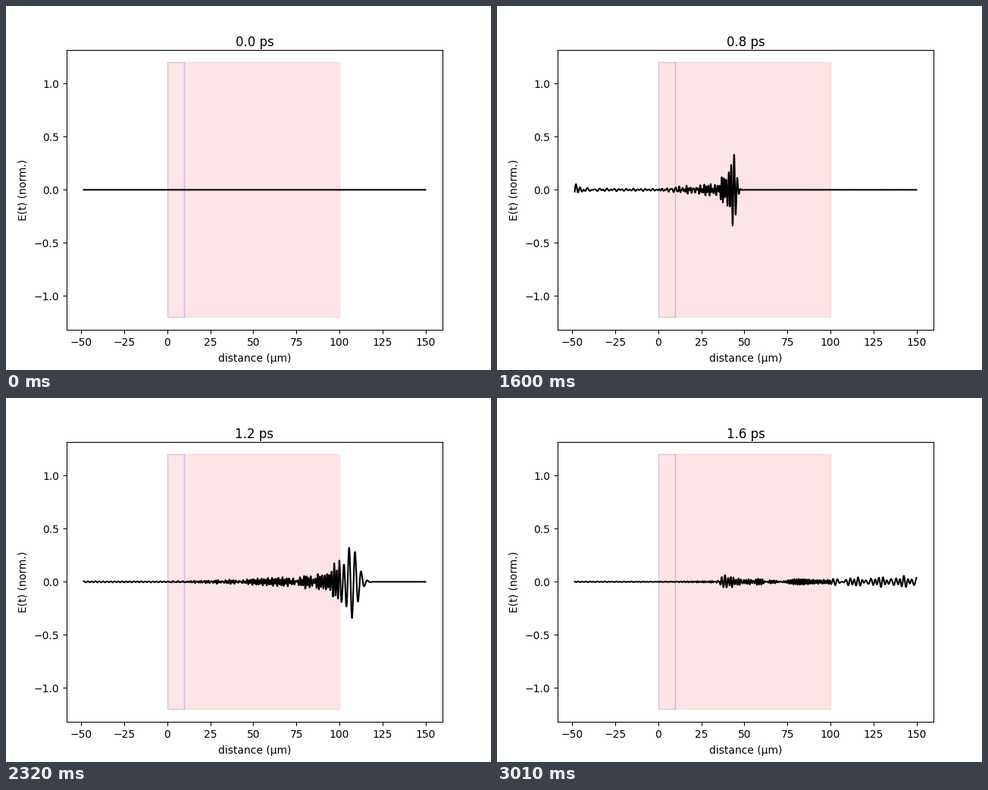
These frames come from a looping animation (640 px wide and 480 px high, 3040 ms). A matplotlib script:

```python
import numpy as np
import matplotlib.pyplot as plt
from matplotlib.animation import FuncAnimation
from matplotlib.patches import Rectangle

LOOP_MS, TICK_MS = 3040, 20
C = 300.0              # speed of light, um/ps
STEP_PS = 0.0161       # simulated time between two pictures
STEPS = 100
ARRIVAL = 0.565        # pulse centre reaches the surface, ps
CARRIER, WIDTH = 100.0, 0.0071   # THz, ps
COAT, SLAB = 10.0, 90.0          # layer thicknesses, um

freq = np.arange(0.125, 230, 0.125)
z = np.linspace(-48.47, 149.9, 1500)


def index(eps, *lines):
    """Complex refractive index from (strength, resonance, damping) lines."""
    total = eps + 0j
    for s, f0, g in lines:
        total = total + s * f0**2 / (f0**2 - freq**2 - 1j * g * freq)
    return np.sqrt(total)


def wave(n, path):
    return np.exp(2j * np.pi / C * (freq * n)[:, None] * path)


def reflect(a, b):
    return (a - b) / (a + b)


def column(a):
    return a[:, None]


def solve_field():
    """Field of the pulse crossing air / coating / slab / air, per step."""
    air = np.ones_like(freq) + 0j
    n1 = index(1.89, (0.92, 30, 6), (0.2, 200, 5), (0.003, 79, 0.2))
    n2 = index(3.41, (0.555, 30, 3), (0.05, 135, 0.12))
    r01, r12, r23 = reflect(air, n1), reflect(n1, n2), reflect(n2, air)

    # reflections seen from the left, gathered from the back to the front
    g2 = r23 * wave(n2, 2 * SLAB)[:, 0]
    back1 = (r12 + g2) / (1 + r12 * g2)
    g1 = back1 * wave(n1, 2 * COAT)[:, 0]
    back0 = (r01 + g1) / (1 + r01 * g1)

    # forward amplitudes at the start of each layer
    a1 = (1 + r01) / (1 + r01 * g1)
    a2 = a1 * wave(n1, COAT)[:, 0] * (1 + r12) / (1 + r12 * g2)
    a3 = a2 * wave(n2, SLAB)[:, 0] * (1 + r23)

    end = COAT + SLAB
    before, after = z[z < 0], z[z >= end] - end
    coat = z[(z >= 0) & (z < COAT)]
    slab = z[(z >= COAT) & (z < end)] - COAT
    modes = np.hstack([
        wave(air, before) + column(back0) * wave(air, -before),
        column(a1) * (wave(n1, coat)
                      + column(back1) * wave(n1, 2 * COAT - coat)),
        column(a2) * (wave(n2, slab)
                      + column(r23) * wave(n2, 2 * SLAB - slab)),
        column(a3) * wave(air, after),
    ])

    spectrum = 1j * WIDTH * np.sqrt(np.pi) * np.exp(
        -(np.pi * WIDTH * (freq - CARRIER))**2)
    tau = np.arange(STEPS) * STEP_PS - ARRIVAL
    phase = np.exp(-2j * np.pi * tau[:, None] * freq)
    field = ((phase * spectrum) @ modes).real * (freq[1] - freq[0])
    field[tau < -0.19] = 0
    return field


def step_at(ms):
    if ms < 700:
        return 4 + (ms - 130) * 6 // 190
    if ms < 760:
        return 22
    return min(24 + (ms - 760) // 30, STEPS - 1)


field = solve_field()

plt.rcParams["font.family"] = "DejaVu Sans"
fig, ax = plt.subplots(figsize=(6.4, 4.8), dpi=100)
ax.add_patch(Rectangle((0, -1.2), 100, 2.4, facecolor="#fde4e6",
                       edgecolor="#fad8da", lw=1))
edge = dict(color="blue", lw=1, zorder=1.5, solid_capstyle="butt")
ax.plot([COAT, 0, 0, COAT], [1.2, 1.2, -1.2, -1.2], alpha=0.1, **edge)
ax.plot([COAT, COAT], [-1.2, 1.2], alpha=0.2, **edge)
line, = ax.plot(z, field[0], color="black", lw=1.5)

ax.set_xlim(-58.39, 159.82)
ax.set_ylim(-1.32, 1.32)
ax.set_xlabel("distance (µm)", labelpad=4.8)
ax.set_ylabel("E(t) (norm.)", labelpad=4.8)
title = ax.set_title("0.0 ps", pad=3.3)


def update(i):
    step = step_at(i * TICK_MS + TICK_MS // 2)
    line.set_ydata(field[step])
    title.set_text(f"{step * STEP_PS:.1f} ps")
    return line, title


anim = FuncAnimation(fig, update, frames=LOOP_MS // TICK_MS,
                     interval=TICK_MS, repeat=True, repeat_delay=0)
plt.show()
```
